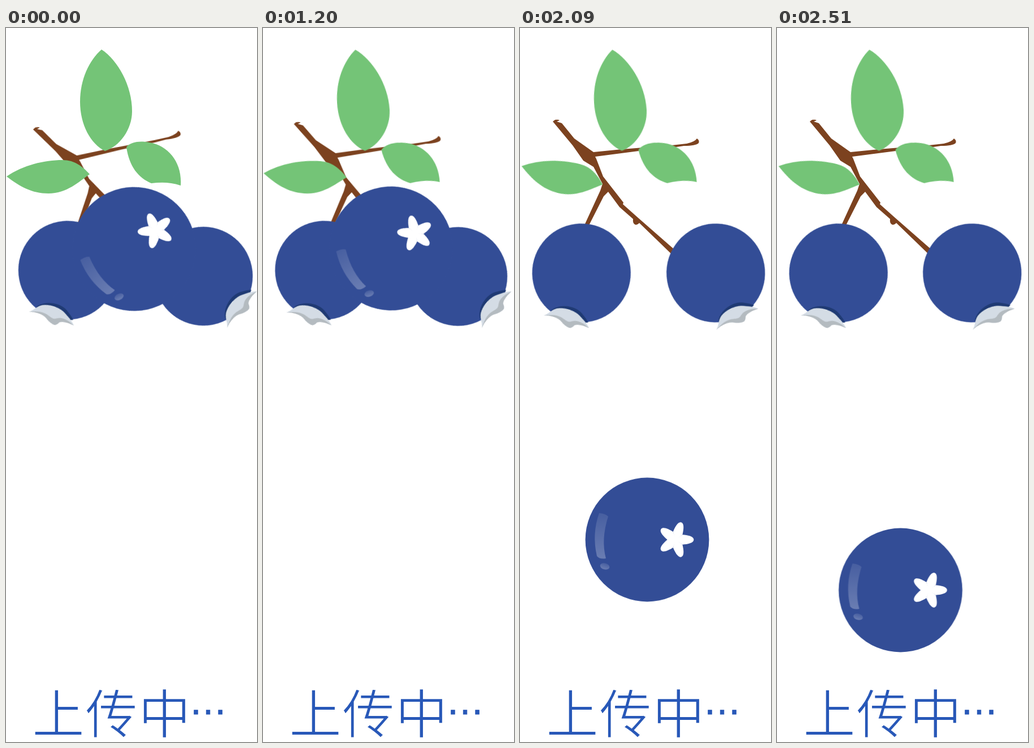
An HTML page without scripts that plays this animation: 444 px wide and 1260 px high, repeating every 3.71 s.

```html
<!DOCTYPE html>
<html lang="zh-CN">
<head>
<meta charset="utf-8">
<title>上传中</title>
<style>
html, body { margin: 0; width: 100%; height: 100%; overflow: hidden; background: #fff; }
svg { display: block; width: 100%; height: 100%; }
text { fill: #2858b8; }
/* The white outline thins the strokes of the regular weight */
.label { font: 300 93px "Noto Sans CJK SC", "Noto Sans CJK", sans-serif; letter-spacing: 1px; stroke: #fff; stroke-width: 2px; }
.dots { font: 68px "Liberation Sans", sans-serif; stroke: #2858b8; }
.berry { fill: #334d96; }
.leaf { fill: #74c477; }
.move { animation: 3710ms step-end infinite; }
.branch { animation-name: branch; transform-origin: 183px 265px; }
.top { animation-name: top; transform-origin: 172px 130px; }
.near { animation-name: near; transform-origin: 261px 244px; }
.far { animation-name: far; transform-origin: 74.5px 260px; }
.left { animation-name: left; }
.right { animation-name: right; }
.drop { animation-name: drop; }

@keyframes branch {
  0%, 9.70%, 22.64%, 35.57% { transform: rotate(-6.2deg); }
  3.23%, 16.17%, 29.11%, 42.04% { transform: rotate(-2deg); }
  47.97%, 100% { transform: none; }
}
@keyframes top {
  0%, 9.70%, 22.64%, 35.57% { transform: none; }
  3.23%, 16.17%, 29.11%, 42.04%, 100% { transform: rotate(-3.5deg); }
}
@keyframes near {
  0%, 9.70%, 22.64%, 35.57% { transform: none; }
  3.23%, 16.17%, 29.11%, 42.04%, 100% { transform: translateY(-.5px) rotate(-6.6deg); }
}
@keyframes far {
  0%, 9.70%, 22.64%, 35.57% { transform: none; }
  3.23%, 16.17%, 29.11%, 42.04% { transform: rotate(4.4deg); }
  47.97%, 100% { transform: rotate(14.3deg); }
}
@keyframes left {
  0%, 12.93%, 25.87%, 38.81% { transform: translate(109px, 427.5px) rotate(17deg); }
  3.23%, 16.17%, 29.11%, 42.04% { transform: translate(108px, 427px) rotate(9deg); }
  6.46%, 19.40%, 32.34%, 45.28% { transform: translate(108.5px, 427.5px) rotate(16deg); }
  9.70%, 22.64%, 35.57% { transform: translate(109.5px, 428px) rotate(23.7deg); }
  47.97% { transform: translate(108.7px, 427.5px) rotate(15.6deg); }
  55.52%, 100% { transform: translate(108.7px, 432.3px) rotate(15.6deg); }
}
@keyframes right {
  0%, 12.93%, 25.87%, 38.81% { transform: translate(349.2px, 438px) rotate(-50.8deg); }
  3.23%, 16.17%, 29.11%, 42.04% { transform: translate(342px, 438.5px) rotate(-43deg); }
  6.46%, 19.40%, 32.34% { transform: translate(345px, 438.5px) rotate(-51deg); }
  9.70%, 22.64%, 35.57% { transform: translate(345px, 438.7px) rotate(-60.3deg); }
  45.28% { transform: translate(344px, 436px) rotate(-35deg); }
  47.97% { transform: translate(346.3px, 432.3px) rotate(-26.6deg); }
  64.41%, 100% { transform: translate(345.3px, 432.3px) rotate(-26.6deg); }
}
/* Swing, free fall, then one slow bounce */
@keyframes drop {
  0%, 12.93%, 25.87%, 38.81% { transform: translate(226.5px, 390px) rotate(-40.5deg); }
  3.23%, 16.17%, 29.11%, 42.04% { transform: translate(227px, 390px) rotate(-32deg); }
  6.46%, 19.40%, 32.34%, 45.28% { transform: translate(226.5px, 389px) rotate(-32deg); }
  9.70%, 22.64%, 35.57% { transform: translate(226px, 387px) rotate(-40.5deg); }
  47.97% { transform: translate(226px, 548.5px) rotate(-15deg); }
  50.67% { transform: translate(225px, 775px) rotate(0deg); }
  51.48% { transform: translate(224.5px, 888px) rotate(0deg); }
  52.29% { transform: translate(224px, 1000.3px) rotate(0deg); animation-timing-function: steps(10); }
  60.37% { transform: translate(226px, 805.5px) rotate(0deg); animation-timing-function: steps(5); }
  64.41% { transform: translate(226px, 914px) rotate(0deg); animation-timing-function: steps(4); }
  67.65%, 100% { transform: translate(218.5px, 992px) rotate(0deg); }
}
</style>
</head>
<body>
<svg viewBox="0 0 444 1260">
  <defs>
    <linearGradient id="shine" x1="0" y1="0" x2="0" y2="1">
      <stop offset="0" stop-color="#fff" stop-opacity=".1"/>
      <stop offset="1" stop-color="#fff" stop-opacity=".27"/>
    </linearGradient>
    <g id="side">
      <circle class="berry" r="87.2"/>
      <path fill="#1f3a73" d="M-34 78C-24 63 6 57 22 70Q32 77 35 81L20 86H-20Z"/>
      <path fill="#d4dce5" d="M-44 90C-37 86-35 78-25 72C-12 66 6 67 18 74C28 80 34 84 39 90C28 89 20 88 13 92Q10 98 6 99Q-2 99-13 91Q-26 84-44 90Z"/>
      <path fill="#b4bbc0" d="M-44 90Q-26 82-13 85C-3 88 0 91 6 87Q18 79 39 90C28 89 20 88 13 92Q10 98 6 99Q-2 99-13 91Q-26 85-44 90Z"/>
    </g>
    <path id="ray" fill="#fff" d="M-1 0L12-8.7C21-8 32-6 32 0S21 8 12 8.7Z"/>
  </defs>

  <path class="move branch" fill="#7c421f" d="M58 165L62 162Q68 161 70 163L65 165L74 168L96 195L130 219L180 214L268 207L295 204Q309 201 313 195Q318 198 316 203Q311 208 290 208L270 211L210 217L133 227L135 231L147 262L183 308L182 311L209 335L272 390L267 398L211 344Q208 348 204 347Q199 345 200 337L176 316L156 289L148 297L120 352L113 350L142 287L146 275L130 245L112 234L93 207Z"/>

  <path class="move leaf top" d="M169 38C198 57 223 102 223 147C223 179 201 209 175 217C150 205 131 171 131 130C131 91 147 57 169 38Z"/>
  <path class="move leaf near" d="M213 210C222 200 238 199 254 202C288 208 312 238 309 278C291 272 275 272 257 274C234 264 218 245 213 210Z"/>
  <path class="move leaf far" d="M1 262C30 242 68 233 100 233C122 233 136 245 148 258C129 271 108 292 75 292C46 292 25 280 1 262Z"/>

  <use class="move left" href="#side"/>
  <use class="move right" href="#side"/>
  <g class="move drop">
    <circle class="berry" r="109.4"/>
    <path fill="url(#shine)" d="M-85-47Q-74-46-69-41Q-82 0-73 33Q-84 35-89 29Q-98-10-85-47Z"/>
    <ellipse fill="url(#shine)" rx="8.5" ry="5.5" transform="translate(-75 47) rotate(15)"/>
    <g transform="translate(50.4 0)">
      <use href="#ray"/>
      <use href="#ray" transform="rotate(72)"/>
      <use href="#ray" transform="rotate(144)"/>
      <use href="#ray" transform="rotate(216)"/>
      <use href="#ray" transform="rotate(288)"/>
    </g>
  </g>

  <text class="label" x="46" y="1245">上传中</text>
  <text class="dots" x="323.5" y="1211">…</text>
</svg>
</body>
</html>
```
